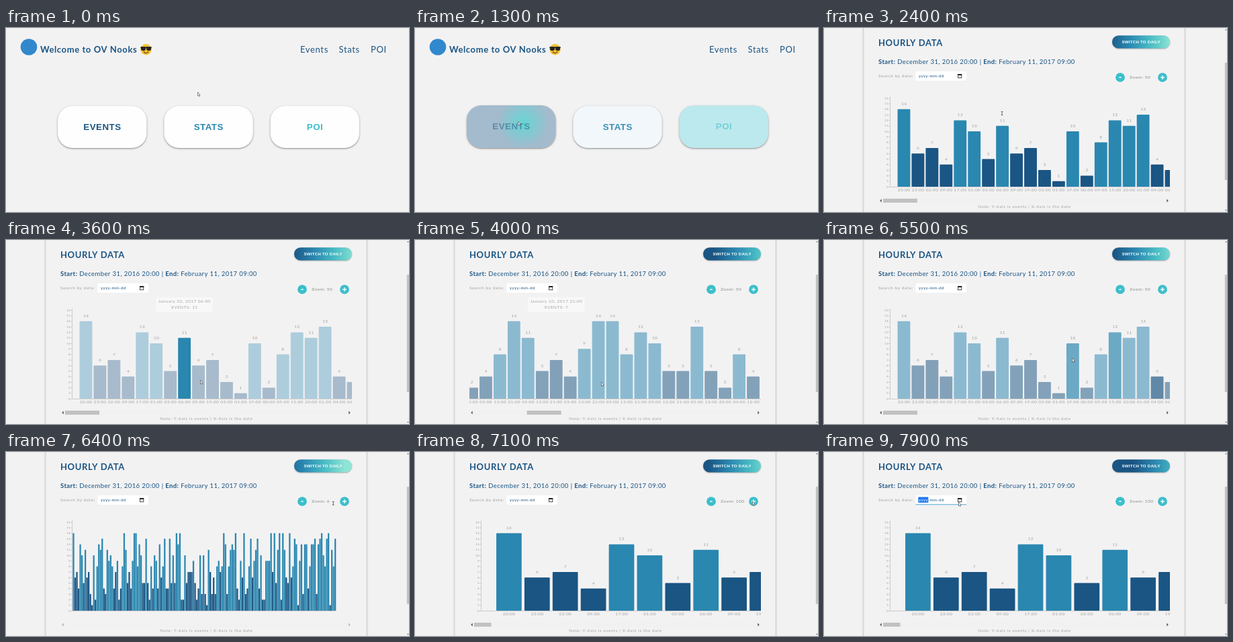
Write an HTML page with a canvas that moves like this. It is 600x276 px and loops after 8000 ms.

```html
<!DOCTYPE html>
<html lang="en">
<head>
<meta charset="utf-8">
<title>Hourly data</title>
<style>
html, body { margin: 0; width: 100%; height: 100%; overflow: hidden; background: #f3f2f3; }
canvas { display: block; }
</style>
</head>
<body>
<canvas id="stage" width="600" height="276"></canvas>
<script>
const g = document.getElementById('stage').getContext('2d');
const LOOP = 8000, PAGE_AT = 1800;
const DARK = '#1a5583', BLUE = '#2a87b0', TEAL = '#3cbfcb', GREY = '#a0a0a0', PAPER = '#f3f2f3';
const LATO = 'Lato, sans-serif', ARIAL = '"Liberation Sans", Arial, sans-serif';
const LEFT = 98, BASE = 238, UNIT = 8.3, COUNT = 156;

const clamp = (v, lo = 0, hi = 1) => Math.max(lo, Math.min(hi, v));
const smooth = u => u * u * (3 - 2 * u);
const ease = (t, from, to) => smooth(clamp((t - from) / (to - from)));

// Value of key points [position, value...] at t
function at(keys, t, k = 1, curve = u => u) {
  const n = keys.findIndex(f => f[0] > t);
  if (n === 0) return keys[0][k];
  if (n < 0) return keys[keys.length - 1][k];
  const a = keys[n - 1], b = keys[n];
  return a[k] + (b[k] - a[k]) * curve((t - a[0]) / (b[0] - a[0]));
}

// Motion
const path = [[0, 286, 99], [450, 150, 145], [850, 460, 148], [1205, 460, 148], [1240, 154, 143], [1700, 154, 143],
  [2350, 265, 128], [2480, 265, 128], [2700, 265, 200], [3570, 265, 210], [3595, 290, 213], [4200, 274, 217],
  [4500, 274, 217], [4560, 340, 217], [5400, 345, 217], [5700, 441, 77], [6200, 441, 77], [6500, 503, 77],
  [7100, 503, 77], [7400, 430, 165], [7850, 201, 78]];
const cursor = t => [at(path, t, 1, smooth), at(path, t, 2, smooth)];
const pageScroll = t => 72 * ease(t, 2100, 2340);
const chartScroll = t => 892 * (ease(t, 3680, 4200) - ease(t, 4750, 5450));
function zoomAt(t) {
  if (t < 6500) return 50 - 22 * clamp(Math.floor((t - 5600) / 200), 0, 2);
  return Math.min(100, 50 + 25 * Math.floor((t - 6500) / 280));
}

// Data: two measured stretches, the rest seeded
const opening = [14, 6, 7, 4, 12, 10, 5, 11, 6, 7, 3, 1, 10, 2, 8, 12, 11, 13, 4, 3];
const middle = [5, 5, 13, 5, 2, 8, 4, 10, 9, 4, 12, 6, 8, 13, 4, 4, 13, 5, 10, 5, 14];
const openingHours = [20, 23, 2, 9, 17, 1, 3, 6, 9, 19, 3, 1, 19, 0, 9, 15, 20, 1, 4, 6];
function random(i) {
  const s = Math.sin(i * 12.9898) * 43758.5;
  return s - Math.floor(s);
}
const values = [], hours = [];
for (let i = 0, day = 0; i < COUNT; i++) {
  values[i] = opening[i] ?? middle[i - 41] ?? 1 + Math.floor(14 * random(i) ** .8);
  if (openingHours[i] <= openingHours[i - 1]) day++;
  hours[i] = i < 20 ? day * 24 + openingHours[i] : Math.round(at([[19, 150], [53, 420], [155, 1017]], i));
}

const two = n => String(n).padStart(2, '0');
const clock = i => two(hours[i] % 24) + ':00';
function stamp(i) {
  const d = new Date(Date.UTC(2016, 11, 31, hours[i]));
  const month = d.toLocaleString('en-US', { month: 'long', timeZone: 'UTC' });
  return `${month} ${two(d.getUTCDate())}, ${d.getUTCFullYear()} ${clock(i)}`;
}

// Drawing helpers
function text(s, x, y, size, color, { bold, gap = 0, align = 'left', family = LATO } = {}) {
  g.font = `${bold ? 'bold ' : ''}${size}px ${family}`;
  g.letterSpacing = gap + 'px';
  g.textAlign = align;
  g.fillStyle = color;
  g.fillText(s, align === 'center' ? x + gap / 2 : x, y);
  return g.measureText(s).width;
}
function rect(x, y, w, h, color) { g.fillStyle = color; g.fillRect(x, y, w, h); }
function round(x, y, w, h, r, fill) {
  g.beginPath(); g.roundRect(x, y, w, h, r);
  g.fillStyle = fill; g.fill();
}
function disc(x, y, r, color) {
  g.beginPath(); g.arc(x, y, r, 0, 7);
  g.fillStyle = color; g.fill();
}
function poly(points, fill, stroke) {
  g.beginPath();
  points.forEach(p => g.lineTo(...p));
  g.closePath();
  g.fillStyle = fill; g.fill();
  if (stroke) { g.strokeStyle = stroke; g.lineWidth = .7; g.stroke(); }
}
// Small scrollbar arrow pointing along (dx, dy)
function arrow(x, y, dx, dy, color) {
  poly([[x + dx, y + dy], [x - dx + 2 * dy, y - dy + 2 * dx], [x - dx - 2 * dy, y - dy - 2 * dx]], color);
}
function shadow(color, blur, y) { g.shadowColor = color; g.shadowBlur = blur; g.shadowOffsetY = y; }
const noShadow = () => shadow('transparent', 0, 0);

function header() {
  disc(34, 28.5, 12.3, '#3188cc');
  text('Welcome to OV Nooks', 51, 36.7, 13, DARK, { bold: true, gap: .6 });
  // emoji with sunglasses
  disc(208.5, 32.3, 8.2, '#f9c234');
  rect(200.3, 28.3, 16.4, 1.6, '#222');
  for (const x of [200.9, 209]) round(x, 28.3, 7.1, 5.8, [1, 1, 3, 3], '#222');
  g.beginPath(); g.arc(208.5, 33.8, 3.8, .4, 2.74);
  g.strokeStyle = '#5b3a18'; g.lineWidth = 1.1; g.stroke();
  [['Events', 438], ['Stats', 495.5], ['POI', 543]].forEach(([s, x]) => text(s, x, 36.7, 13, DARK, { gap: .65 }));
}

const cards = [['EVENTS', DARK], ['STATS', BLUE], ['POI', TEAL]]
  .map(([label, color], i) => ({ label, color, x: 77 + i * 158.3 }));
function overCard(c, t) {
  const [x, y] = cursor(t);
  return t > 0 && x > c.x && x < c.x + 132 && y > 117 && y < 180;
}

function card(c, t) {
  // quick to light up, slow to fade
  let k = 0;
  for (let j = 0; j < 14; j++) if (overCard(c, t - j * 50)) k = Math.max(k, 1 - j / 14);
  const y = 117 - k, shape = fill => round(c.x, y, 132.5, 63 + k, 22, fill);
  shadow('rgba(0,0,0,.45)', 2.5, 1);
  shape('#fefefe');
  noShadow();
  g.globalAlpha = .4 * k;
  shape(c.color);
  if (overCard(c, t)) {
    const [x, py] = cursor(t);
    const glow = g.createRadialGradient(x + 7, py - 1, 2, x + 7, py - 1, 38);
    glow.addColorStop(0, '#55dcd7');
    glow.addColorStop(1, '#55dcd700');
    g.globalAlpha = .75 * k;
    shape(glow);
  }
  g.globalAlpha = 1 - .5 * k;
  text(c.label, c.x + 66.2, 152.7 - k, 13.3, c.color, { bold: true, gap: .5, align: 'center', family: ARIAL });
  g.globalAlpha = 1;
}

const pitchAt = t => zoomAt(t) * .419;

function barUnder(t) {
  if (t < PAGE_AT) return -1;
  const [x, py] = cursor(t), y = py - 72 + pageScroll(t);
  const i = Math.round((x + chartScroll(t) - LEFT) / pitchAt(t)) - 1;
  return y < BASE && y > BASE - values[i] * UNIT && x > 81 && x < 515 ? i : -1;
}

function chart(t) {
  const zoom = zoomAt(t), scroll = chartScroll(t), pitch = pitchAt(t);
  const center = i => LEFT + (i + 1) * pitch - scroll;
  const recent = [0, 1, 2, 3].map(j => barUnder(t - 110 - j * 40));
  g.save();
  g.beginPath(); g.rect(81, 80, 434, 170); g.clip();
  rect(LEFT - scroll, 103, .7, BASE - 103, '#bbb');
  rect(LEFT - scroll, BASE, COUNT * pitch, .7, '#bbb');
  for (let v = 0; v <= 16; v++) {
    const y = BASE - v * UNIT;
    rect(LEFT - 2 - scroll, y, 2, .6, '#bbb');
    text(v, LEFT - 2.5 - scroll, y + 1.6, 4.5, GREY, { align: 'right' });
  }
  for (let i = 0; i < COUNT; i++) {
    const x = center(i), v = values[i], top = BASE - v * UNIT;
    if (x < 81 - pitch || x > 515 + pitch) continue;
    const lit = recent.filter(n => n < 0 || n === i).length / recent.length;
    g.globalAlpha = .35 + .65 * lit;
    round(x - pitch * .45, top, pitch * .9, v * UNIT, Math.min(1, pitch / 8), v > 7 ? BLUE : DARK);
    g.globalAlpha = 1;
    if (zoom < 25) continue;
    text(v, x, top - 6, 6.5, GREY, { gap: .4, align: 'center' });
    text(clock(i), x, 244.7, 6.5, GREY, { gap: .4, align: 'center' });
  }
  g.restore();

  const tip = barUnder(t - 30);
  if (tip >= 0) {
    const x = center(tip);
    round(x - 42.5, 86, 85, 22, 2, 'rgba(255,255,255,.5)');
    text(stamp(tip), x, 94.3, 6.2, GREY, { gap: .6, align: 'center' });
    text('EVENTS: ' + values[tip], x, 102.8, 6.2, GREY, { gap: .6, align: 'center' });
  }

  const live = zoom > 12, tint = live ? '#505050' : '#b0b0b0';
  rect(81, 255.5, 434, 7, '#f1f1f1');
  arrow(84.5, 259, -1.2, 0, tint);
  arrow(511.5, 259, 1.2, 0, tint);
  if (live) rect(88 + scroll * .131, 256, 2550 / zoom, 6, '#c1c1c1');
}

function dateField(focus) {
  text('Search by date:', 81, 74.2, 6.5, GREY, { gap: .55 });
  round(136.5, 65, 75.5, 14, 2, '#fff');
  if (focus) {
    rect(136.5, 78.3, 75.5, 1, '#4aa8d8');
    rect(140.3, 67.5, 15, 8.5, '#1e78f0');
  }
  const w = text('yyyy', 141, 74, 6.2, focus ? '#fff' : DARK, { gap: .3 });
  text('-mm-dd', 141 + w, 74, 6.2, DARK, { gap: .3 });
  g.strokeStyle = '#222'; g.lineWidth = .8;
  g.strokeRect(199.4, 69.4, 5.4, 5.4);
  rect(199, 69, 6.2, 2, '#222');
}

function switchButton(t) {
  const x = 429 - 25 * (1 - Math.cos((t - 4600) / 3300 * 2 * Math.PI));
  const fill = g.createLinearGradient(x, 0, x + 125, 0);
  [DARK, DARK, BLUE, '#48bcc4', '#8fe5d4'].forEach((c, i) => fill.addColorStop(i / 4, c));
  shadow('rgba(0,0,0,.35)', 2, .7);
  round(429, 11.3, 86, 19.3, 9.6, fill);
  noShadow();
  text('SWITCH TO DAILY', 472, 23, 6, '#fff', { bold: true, gap: .3, align: 'center', family: ARIAL });
}

function dataPage(t) {
  const up = pageScroll(t);
  g.save();
  g.translate(0, -up);
  header();
  g.translate(0, 72);
  shadow('rgba(0,0,0,.3)', 3, 0);
  rect(59.3, -8, 477.4, 308, PAPER);
  noShadow();

  text('HOURLY DATA', 81, 27.3, 13, DARK, { bold: true, gap: .6 });
  let x = 81;
  ['Start:', ' December 31, 2016 20:00 | ', 'End:', ' February 11, 2017 09:00']
    .forEach((s, i) => x += text(s, x, 53.8, 9.5, DARK, { bold: i % 2 === 0, gap: .41 }));
  switchButton(t);
  dateField(t > 7830);
  for (const [cx, arm] of [[441, 1.8], [504, 3]]) {
    disc(cx, 74.2, 6.9, TEAL);
    rect(cx - arm, 73.5, arm * 2, 1.4, '#fff');
    if (arm === 3) rect(cx - .7, 71.2, 1.4, 6, '#fff');
  }
  text('Zoom: ' + zoomAt(t), 455, 76.3, 6.5, '#888', { gap: .5 });
  chart(t);
  text('Note: Y-Axis is events | X-Axis is the date', 298, 269.8, 6.1, GREY, { gap: .67, align: 'center' });
  g.restore();

  rect(596.5, 0, 3.5, 276, '#f1f1f1');
  rect(596.8, 6 + up * .64, 3.2, 176, '#c1c1c1');
  arrow(598.4, 2.5, 0, -.7, '#505050');
  arrow(598.4, 273.5, 0, .7, '#505050');
}

function pointer(t) {
  const beam = t > 2250 && t < 2560 || t > 6320 && t < 6450;
  g.save();
  g.translate(...cursor(t));
  if (beam) {
    rect(-.4, -2.6, .8, 5.2, '#444');
    for (const y of [-3, 2.3]) rect(-1.5, y, 3, .7, '#444');
  } else {
    poly([[-.5, -3], [-.5, 3], [.8, 1.9], [1.7, 3.6], [2.5, 3.2], [1.7, 1.5], [3, 1.3]], '#fff', '#555');
  }
  g.restore();
}

function draw(now) {
  const t = now % LOOP;
  rect(0, 0, 600, 276, PAPER);
  if (t < PAGE_AT) {
    header();
    cards.forEach(c => card(c, t));
  } else {
    dataPage(t);
  }
  pointer(t);
  requestAnimationFrame(draw);
}
requestAnimationFrame(draw);
</script>
</body>
</html>
```
